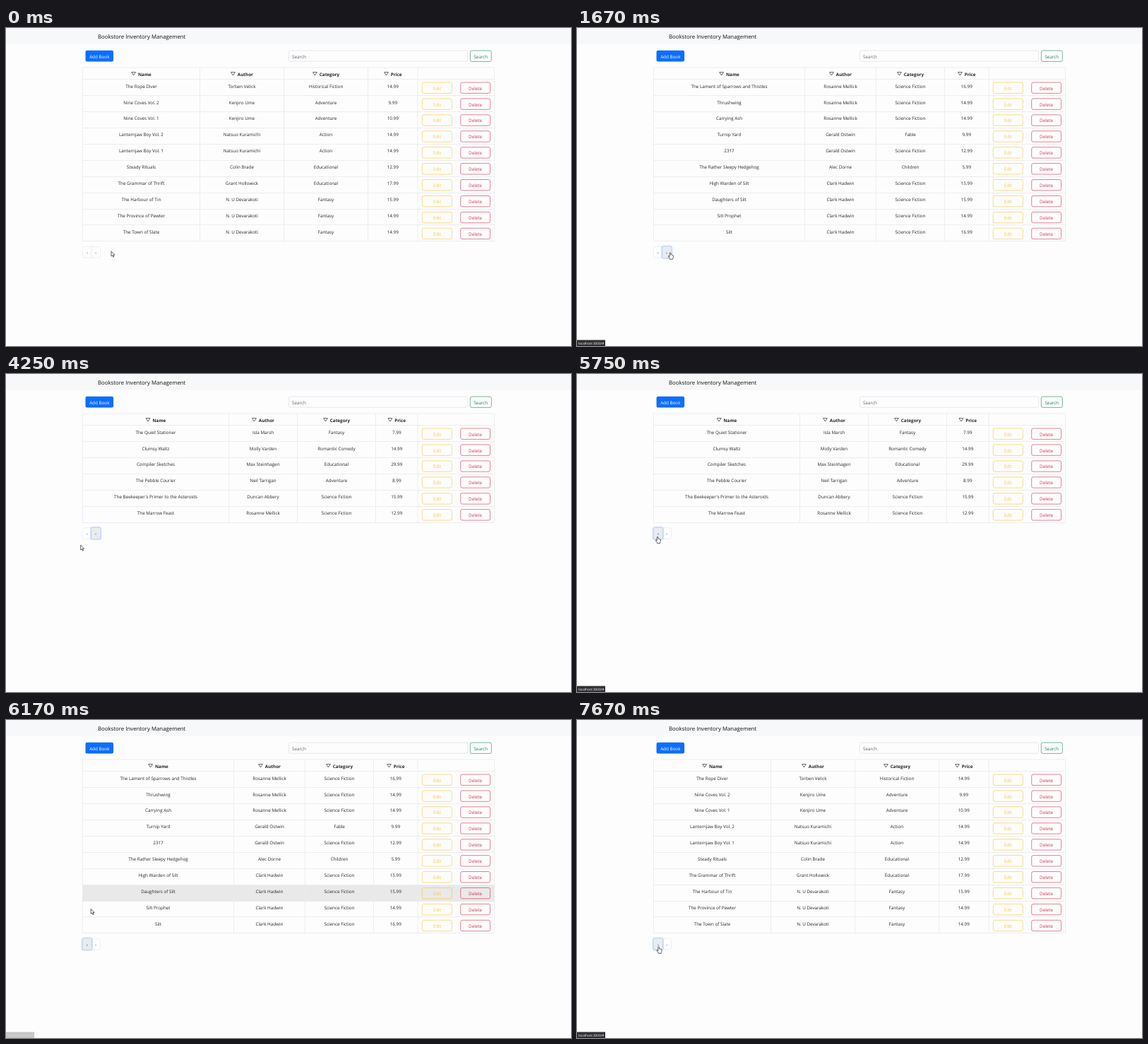
Recreate the animation shown at these times as an HTML page with a canvas. Size 800 px wide and 450 px high, loop 8000 ms.

```html
<!DOCTYPE html>
<html lang="en">
<head>
<meta charset="utf-8">
<title>Bookstore Inventory Management</title>
<style>
  html, body { margin: 0; width: 100%; height: 100%; overflow: hidden; background: #fefdfe; }
  canvas { display: block; width: 800px; height: 450px; }
</style>
</head>
<body>
<canvas id="stage"></canvas>
<script>
const canvas = document.getElementById('stage');
const ctx = canvas.getContext('2d');
const ratio = window.devicePixelRatio || 1;
canvas.width = 800 * ratio;
canvas.height = 450 * ratio;

const LOOP = 8000, FPS = 12;
const FONT = '"Open Sans", "Noto Sans", sans-serif';
const INK = '#212529', LINE = '#e9ebee', BLUE = '#0d6efd', GREEN = '#198754',
      GOLD = '#f7c52e', RED = '#cf3048', GREY = '#e9ecef';
const LEFT = 108.5, RIGHT = 691.5, TOP = 56, HEAD = 17, ROW = 22.92;
const HEADINGS = ['Name', 'Author', 'Category', 'Price'];

const makePage = (cols, text) => ({
  cols: [LEFT, ...cols, 583],
  rows: text.trim().split('\n').map(line => line.trim().split('|'))
});

const first = makePage([274.5, 393.5, 512.5], `
  The Rope Diver|Torben Velick|Historical Fiction|14.99
  Nine Coves Vol. 2|Kenjiro Ume|Adventure|9.99
  Nine Coves Vol. 1|Kenjiro Ume|Adventure|10.99
  Lanternjaw Boy Vol. 2|Natsuo Kuramichi|Action|14.99
  Lanternjaw Boy Vol. 1|Natsuo Kuramichi|Action|14.99
  Steady Rituals|Colin Brade|Educational|12.99
  The Grammar of Thrift|Grant Hollowick|Educational|17.99
  The Harbour of Tin|N. U Devarakoti|Fantasy|15.99
  The Province of Pewter|N. U Devarakoti|Fantasy|14.99
  The Town of Slate|N. U Devarakoti|Fantasy|14.99`);

const second = makePage([322.5, 423.5, 520.5], `
  The Lament of Sparrows and Thistles|Rosanne Mellick|Science Fiction|16.99
  Thrushwing|Rosanne Mellick|Science Fiction|14.99
  Carrying Ash|Rosanne Mellick|Science Fiction|14.99
  Turnip Yard|Gerald Ostwin|Fable|9.99
  2317|Gerald Ostwin|Science Fiction|12.99
  The Rather Sleepy Hedgehog|Alec Dorne|Children|5.99
  High Warden of Silt|Clark Hadwin|Science Fiction|15.99
  Daughters of Silt|Clark Hadwin|Science Fiction|15.99
  Silt Prophet|Clark Hadwin|Science Fiction|14.99
  Silt|Clark Hadwin|Science Fiction|16.99`);

const third = makePage([315.5, 412.5, 523.5], `
  The Quiet Stationer|Isla Marsh|Fantasy|7.99
  Clumsy Waltz|Molly Varden|Romantic Comedy|14.99
  Compiler Sketches|Max Steinhagen|Educational|29.99
  The Pebble Courier|Neil Tarrigan|Adventure|8.99
  The Beekeeper's Primer to the Asteroids|Duncan Abbery|Science Fiction|15.99
  The Marrow Feast|Rosanne Mellick|Science Fiction|12.99`);

// Tracks are [tick, value...]; twelve ticks make a second.
const PAGES = [[0, first], [13, second], [36, third], [70, second], [92, first]];
const FOCUS = [[0, ''], [12, 'next'], [66, 'prev']];
const HOVER = [[0, ''], [10, 'next'], [36, ''], [55, 'prev'], [70, ''], [77, 'prev']];
const HAND = [[0, false], [8, true], [40, false], [55, true], [71, false], [77, true]];
const STATUS = [[9, 0], [11, 1], [39, 1], [41, 0], [55, 0], [57, 1], [71, 1], [74, .27], [75, 0], [81, 0], [83, 1]];
const POINTER = [
  [5, 149, 316], [6, 143, 317], [7, 135, 318], [8, 131, 317.4], [10, 132, 317.6], [42, 132, 317.6],
  [43, 131, 314], [44, 128, 303], [46, 122, 280], [48, 112, 258], [50, 106, 245], [51, 105.7, 242],
  [52, 106, 241], [54, 110, 234], [55, 113, 230], [57, 114, 230], [71, 114, 230],
  [72, 114.5, 233], [73, 117, 246], [74, 120.2, 267.3], [75, 120.5, 290], [76, 119, 306],
  [78, 116.5, 318], [80, 115.6, 320.6]
];

const held = (track, tick) => track.filter(key => key[0] <= tick).pop()[1];

function between(track, tick) {
  const i = track.findIndex(key => key[0] > tick);
  if (i === 0) return track[0].slice(1);
  if (i < 0) return track[track.length - 1].slice(1);
  const a = track[i - 1], b = track[i], k = (tick - a[0]) / (b[0] - a[0]);
  return a.slice(1).map((v, n) => v + (b[n + 1] - v) * k);
}

function text(str, x, y, { color = INK, size = 6.3, weight = 400, align = 'center' } = {}) {
  ctx.font = `${weight} ${size}px ${FONT}`;
  ctx.textAlign = align;
  ctx.fillStyle = color;
  ctx.fillText(str, x, y);
}

function box(x, y, w, h, { fill, stroke, width = 0.6, radius = 2.3 }) {
  ctx.beginPath();
  ctx.roundRect(x, y, w, h, radius);
  if (fill) { ctx.fillStyle = fill; ctx.fill(); }
  if (stroke) { ctx.strokeStyle = stroke; ctx.lineWidth = width; ctx.stroke(); }
}

function line(x1, y1, x2, y2) {
  ctx.beginPath();
  ctx.moveTo(x1, y1);
  ctx.lineTo(x2, y2);
  ctx.strokeStyle = LINE;
  ctx.lineWidth = 0.9;
  ctx.stroke();
}

function button(label, x, y, w, color) {
  box(x, y, w, 15.4, { stroke: color });
  text(label, x + w / 2, y + 10.6, { color });
}

function drawTop() {
  ctx.fillStyle = '#fefdfe';
  ctx.fillRect(0, 0, 800, 450);
  ctx.fillStyle = '#f7f8f9';
  ctx.fillRect(0, 0, 800, 23);
  text('Bookstore Inventory Management', 130, 15.4, { color: '#111', size: 7.82, align: 'left' });
  box(112.5, 31.7, 39.6, 15.8, { fill: BLUE });
  text('Add Book', 132.3, 42.7, { color: '#fff' });
  box(400.4, 32, 253.2, 15.3, { stroke: '#d5d9de' });
  text('Search', 405, 42.7, { color: '#5c636a', align: 'left' });
  button('Search', 657.3, 32, 30, GREEN);
}

function heading(label, center) {
  ctx.font = `700 6.3px ${FONT}`;
  const x = center - (ctx.measureText(label).width + 9.8) / 2;
  ctx.beginPath();
  ctx.moveTo(x + 0.5, 62.6);
  ctx.lineTo(x + 6.3, 62.6);
  ctx.lineTo(x + 3.4, 67);
  ctx.closePath();
  ctx.strokeStyle = INK;
  ctx.lineWidth = 0.7;
  ctx.stroke();
  text(label, x + 9.8, 67.5, { weight: 700, align: 'left' });
}

function drawTable({ cols, rows }, hovered) {
  const body = TOP + HEAD, bottom = body + ROW * rows.length;
  const snap = y => Math.floor(y) + 0.5;
  const center = i => (cols[i] + cols[i + 1]) / 2;
  if (rows[hovered]) {
    ctx.fillStyle = '#e9e9e9';
    ctx.fillRect(LEFT, body + ROW * hovered, RIGHT - LEFT, ROW);
  }
  line(LEFT, TOP, RIGHT, TOP);
  for (let i = 0; i <= rows.length; i++) {
    const y = snap(body + ROW * i - 0.3);
    line(LEFT, y, RIGHT, y);
  }
  [...cols, RIGHT].forEach(x => line(x, TOP, x, bottom));
  HEADINGS.forEach((label, i) => heading(label, center(i)));
  rows.forEach((row, r) => {
    const y = body + ROW * r;
    row.forEach((cell, i) => text(cell, center(i), y + 11.6));
    button('Edit', 589.3, y + 4, 42, GOLD);
    button('Delete', 643.7, y + 4, 41.8, RED);
  });
  return bottom;
}

function drawPager(y, focus, hover) {
  const link = (name, glyph, x, corners) => {
    const active = focus === name, lit = active || hover === name;
    if (active) box(x - 0.8, y - 0.8, 14.1, 17.2, { stroke: 'rgba(13,110,253,.27)', width: 1.7, radius: 3 });
    box(x, y, 12.5, 15.6, { fill: lit ? GREY : '#fff', stroke: '#dee2e6', radius: corners });
    text(glyph, x + 6.2, y + 10.5, { color: lit ? '#3f7fd6' : '#5c9bfb', size: 5.4 });
  };
  const prev = () => link('prev', '«', 108.6, [2.5, 0, 0, 2.5]);
  const next = () => link('next', '»', 121, [0, 2.5, 2.5, 0]);
  (focus === 'prev' ? [next, prev] : [prev, next]).forEach(draw => draw());
}

function drawStatus(alpha) {
  ctx.globalAlpha = alpha;
  ctx.fillStyle = '#2e3033';
  ctx.fillRect(0, 441.5, 40, 8.5);
  text('localhost:3000/#', 2, 447.8, { color: '#fff', size: 4.7, align: 'left' });
  ctx.globalAlpha = 1;
}

const ARROW = new Path2D('M0 0V7L1.6 5.6L2.8 8.2L3.9 7.7L2.8 5.2H4.9Z');
const PALM = new Path2D('M-.8 .8Q0 -.5 .8 .8V3.2Q1.6 2.8 2.1 3.5Q2.9 3.1 3.3 3.9Q4.3 3.6 4.3 4.8V6.8Q4.1 8 3.5 8.5V9.6H-.5V8.6L-2.7 5.7Q-2.9 4.7 -2 4.9L-.8 6Z');

function drawPointer(x, y, hand) {
  const shape = hand ? PALM : ARROW;
  ctx.save();
  ctx.translate(x, y);
  ctx.fillStyle = '#fff';
  ctx.strokeStyle = '#222';
  ctx.lineWidth = 0.7;
  ctx.lineJoin = 'round';
  ctx.fill(shape);
  ctx.stroke(shape);
  ctx.restore();
}

// The row highlight trails the pointer by one tick.
function rowUnder(tick) {
  if (tick < 71 || tick > 76) return -1;
  return Math.floor((between(POINTER, tick - 1)[1] - TOP - HEAD) / ROW);
}

function draw(now) {
  const tick = Math.floor((now % LOOP) * FPS / 1000);
  ctx.setTransform(ratio, 0, 0, ratio, 0, 0);
  ctx.textRendering = 'geometricPrecision';
  drawTop();
  const bottom = drawTable(held(PAGES, tick), rowUnder(tick));
  drawPager(bottom + 7.1, held(FOCUS, tick), held(HOVER, tick));
  drawStatus(between(STATUS, tick)[0]);
  drawPointer(...between(POINTER, tick), held(HAND, tick));
}

let start;
function loop(now) {
  start ??= now;
  draw(now - start);
  requestAnimationFrame(loop);
}
requestAnimationFrame(loop);
</script>
</body>
</html>
```
